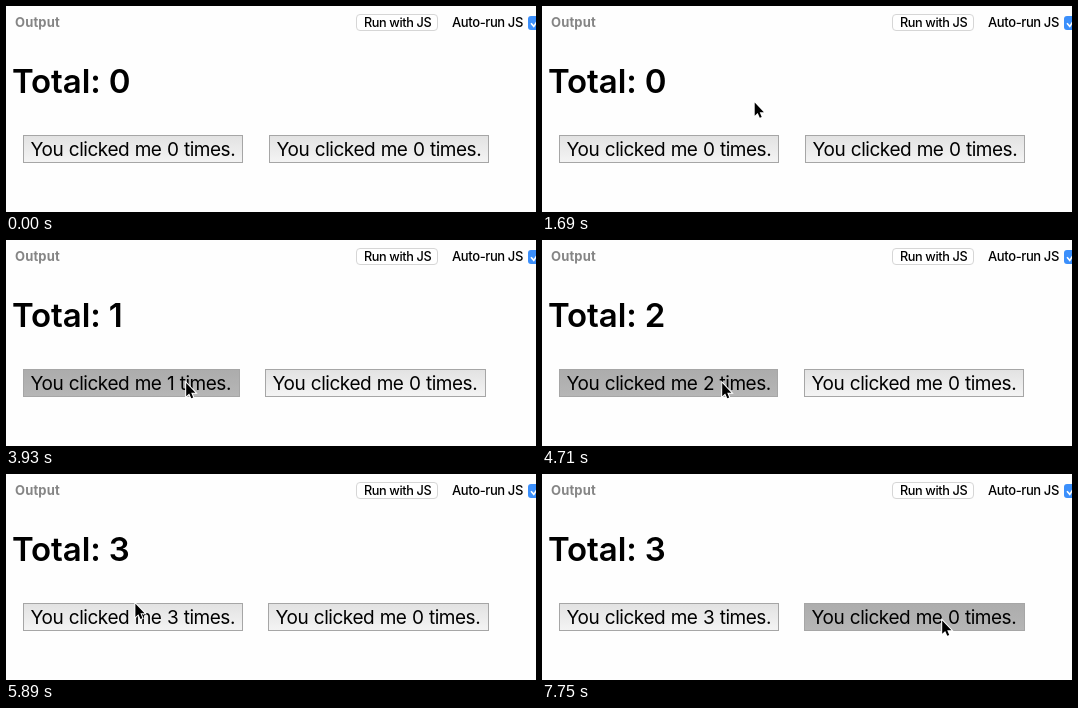
An HTML page that plays this animation: 530x206 px, repeating every 7.99 s.

```html
<!DOCTYPE html>
<html lang="en">
<head>
<meta charset="utf-8">
<title>Click counter</title>
<style>
  html, body { margin: 0; width: 100%; height: 100%; overflow: hidden; background: #fefefe; }
  svg { display: block; width: 530px; height: 206px; font-family: Inter, Roboto, sans-serif; }
  .title { font-size: 33px; font-weight: 600; letter-spacing: -.003em; }
  .label { font-size: 19px; letter-spacing: -.024em; word-spacing: .03em; }
  .small { font-size: 12.7px; font-weight: 500; letter-spacing: -.03em; }
  .panel { font-size: 13px; font-weight: 700; letter-spacing: .012em; fill: #858585; }
</style>
</head>
<body>
<svg viewBox="0 0 530 206" xmlns="http://www.w3.org/2000/svg">
  <defs>
    <linearGradient id="up" x2="0" y2="1">
      <stop stop-color="#e2e2e2"/><stop offset="1" stop-color="#f4f4f4"/>
    </linearGradient>
    <linearGradient id="down" x2="0" y2="1">
      <stop stop-color="#acacac"/><stop offset="1" stop-color="#b6b6b6"/>
    </linearGradient>
    <path id="beamShape" d="M-4 -7.5Q0 -7.5 0 -5Q0 -7.5 4 -7.5M0 -5V5M-4 7.5Q0 7.5 0 5Q0 7.5 4 7.5M-2 3H2"/>
  </defs>
  <rect width="530" height="206" fill="#fefefe"/>

  <text class="panel" x="9" y="21">Output</text>
  <rect x="350.5" y="8.5" width="81" height="16" rx="3.5" fill="#fff" stroke="#d6d6d6"/>
  <text class="small" x="358" y="21">Run with JS</text>
  <text class="small" x="446" y="21" style="font-size:13px">Auto-run JS</text>
  <rect x="522" y="10" width="14" height="14" rx="3" fill="#3b8ffb"/>
  <path d="M525 17.2l2.8 3.2 5-7.6" fill="none" stroke="#fff" stroke-width="1.6"/>

  <text class="title" id="total" x="6" y="86.5"></text>
  <g id="left">
    <rect x=".5" y=".5" height="27" stroke="#a6a6a6"/>
    <text class="label" x="7.6" y="21"></text>
  </g>
  <g id="right">
    <rect x=".5" y=".5" height="27" stroke="#a6a6a6"/>
    <text class="label" x="7.6" y="21"></text>
  </g>

  <path id="arrow" d="M.7 1.5V14.8L3.7 12 5.8 16.8 7.7 16 5.7 11.2H9.9Z"
        fill="#000" stroke="#fff" stroke-width="2" paint-order="stroke"/>
  <g id="beam" fill="none">
    <use href="#beamShape" stroke="#fff" stroke-width="2.4"/>
    <use href="#beamShape" stroke="#111" stroke-width="1.1"/>
  </g>
</svg>
<script>
const LOOP = 7990;
const $ = id => document.getElementById(id);

// Layout: button width follows the shown digit, the gap stays fixed.
const LEFT = 17, GAP = 25.7, BASE = 220.4;
const DIGIT_WIDTH = [219.9, 216.6, 219.2, 219.6];

const CLICKS = [{ down: 2920, up: 3280 }, { down: 3930, up: 4290 }, { down: 4710, up: 4890 }];
const LAST_PRESS = 7750;

// Pointer path: each move bends toward one control point and ends at `to`.
const START = [119, 204];
const MOVES = [
  { start: 500, end: 1150, steps: 11, bend: [160, 105], to: [178, 91] },
  { start: 1390, end: 1690, steps: 6, bend: [195, 91], to: [212, 95] },
  { start: 2160, end: 2680, steps: 10, bend: [190, 118], to: [179.5, 141.5] },
  { start: 4890, end: 5670, steps: 14, bend: [157, 184], to: [140, 153] },
  { start: 5730, end: 6470, steps: 14, bend: [54, -37], to: [102, 96] },
  { start: 6530, end: 7270, steps: 14, bend: [86, 92], to: [399.5, 145] }
];

const ease = p => p * p * p * (10 - 15 * p + 6 * p * p);
const curve = (a, b, c, u) => (1 - u) ** 2 * a + 2 * u * (1 - u) * b + u * u * c;

function pointer(t) {
  const i = MOVES.filter(m => t >= m.start).length - 1;
  if (i < 0) return null;
  const { start, end, steps, bend, to } = MOVES[i];
  const from = i ? MOVES[i - 1].to : START;
  const step = Math.floor((t - start) / (end - start) * (steps - 1) + 0.1) + 1;
  const u = ease(Math.min(1, step / steps));
  return from.map((a, k) => curve(a, bend[k], to[k], u));
}

function place(id, pos, visible = true) {
  $(id).style.display = visible ? "" : "none";
  if (visible) $(id).setAttribute("transform", `translate(${pos})`);
}

function drawButton(id, x, width, count, pressed) {
  const [rect, text] = $(id).children;
  const left = Math.round(x);
  place(id, [left, 129]);
  rect.setAttribute("width", Math.round(x + width) - left - 1);
  rect.setAttribute("fill", pressed ? "url(#down)" : "url(#up)");
  text.textContent = `You clicked me ${count} times.`;
}

function render(t) {
  const count = CLICKS.filter(c => t >= c.up).length;
  const pressed = CLICKS.some(c => t >= c.down && t < c.up);
  const width = DIGIT_WIDTH[count];
  $("total").textContent = `Total: ${count}`;
  drawButton("left", LEFT, width, count, pressed);
  drawButton("right", LEFT + width + GAP, BASE, 0, t >= LAST_PRESS);

  const pos = pointer(t);
  const overText = pos && pos[0] < 123 && pos[1] > 53 && pos[1] < 99;
  place("arrow", pos, pos && !overText);
  place("beam", pos, overText);
}

function tick() {
  render(performance.now() % LOOP);
  requestAnimationFrame(tick);
}
tick();
</script>
</body>
</html>
```
